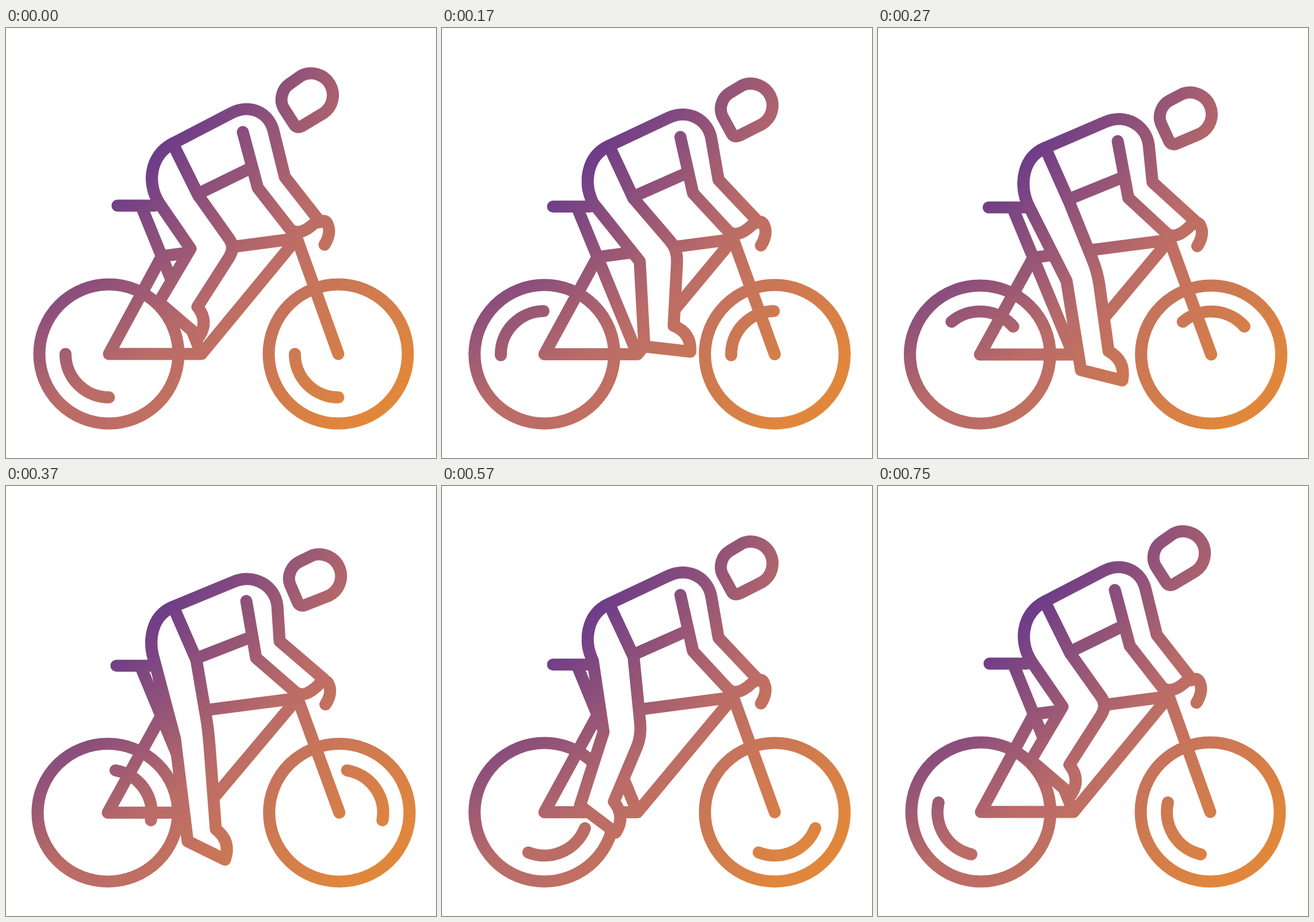
These frames come from a looping animation (748 by 748 pixels, 0.77 s). An HTML page with a canvas:

```html
<!DOCTYPE html>
<html lang="en">
<head>
<meta charset="utf-8">
<title>Cyclist</title>
<style>
  html, body { margin: 0; width: 100%; height: 100%; overflow: hidden; background: #fff; }
  canvas { display: block; }
</style>
</head>
<body>
<canvas id="stage" width="748" height="748"></canvas>
<script>
const SIZE = 748, LOOP = 770, CYCLE = 30;
const ctx = document.getElementById('stage').getContext('2d');

// Rose to orange along the diagonal, with a wide purple glow from the upper left
function makeInk() {
  const sheet = document.createElement('canvas');
  sheet.width = sheet.height = SIZE;
  const paint = sheet.getContext('2d');
  const base = paint.createLinearGradient(426, 426, 645, 645);
  base.addColorStop(0, '#bb6c67');
  base.addColorStop(1, '#e1873c');
  const glow = paint.createRadialGradient(-382, -382, 879, -382, -382, 1142);
  glow.addColorStop(0, 'rgba(109, 60, 137, 1)');
  glow.addColorStop(1, 'rgba(109, 60, 137, 0)');
  for (const fill of [base, glow]) {
    paint.fillStyle = fill;
    paint.fillRect(0, 0, SIZE, SIZE);
  }
  return ctx.createPattern(sheet, 'no-repeat');
}
const ink = makeInk();

const lerp = (a, b, k) => a + (b - a) * k;
const between = (p, q, k) => [lerp(p[0], q[0], k), lerp(p[1], q[1], k)];

// Blend two path strings that share the same commands
function blend(from, to, k) {
  const goal = to.match(/\d+/g);
  let n = 0;
  return from.replace(/\d+/g, v => lerp(+v, +goal[n++], k).toFixed(2));
}

const frame = new Path2D(
  'M194 309H258 M235 309L340 567 M506 366L271 397L179 567H340L506 366L578 567' +
  'M545 338Q556 331 560 343C565 354 560 368 554 377');

const head = new Path2D(
  'M482 140C474 126 479 107 492 98L512.5 83.5A38 38 0 0 1 551.5 148.5' +
  'L514 171Q505 176 500 168Z');

// Rider's upper body, raised and lowered
const torso = [
  'M266 304C245 270 250 222 290 201L392 148C425 131 459 147 466 182L485 259L543 333' +
  'Q514 364 495 351L438 278L412 181 M290 201L335 292 M335 288L427 243',
  'M258 304C247 270 252 226 291 210L395 167C432 151 468 174 472 208L476 270L553 336' +
  'Q521 373 503 358L435 299L418 200 M291 210L331 302 M333 299L428 262'
];
const rump = [
  'M335 292L290 201C250 222 245 270 266 304',
  'M331 302L291 210C252 226 247 270 258 304'
];

// Leg poses around one pedal turn: back of knee, heel, toe, ankle, kneecap
const poseSteps = [0, 7, 11, 15, 19, 23];
const poses = [
  [321, 384, 266, 477, 336, 537, 333, 485, 399, 382],
  [344, 406, 352, 554, 432, 563, 403, 518, 410, 386],
  [328, 440, 353, 595, 425, 613, 401, 562, 382, 425],
  [294, 440, 316, 618, 381, 650, 365, 597, 352, 425],
  [281, 444, 265, 605, 328, 646, 320, 587, 340, 451],
  [281, 428, 240, 556, 302, 603, 299, 549, 347, 435]
];

function legPose(step) {
  const count = poses.length;
  step %= CYCLE;
  let k = count - 1;
  while (poseSteps[k] > step) k--;
  const at = n => poses[(n + count) % count];
  const when = n => poseSteps[(n + count) % count] + CYCLE * Math.floor(n / count);
  const span = when(k + 1) - when(k), u = (step - when(k)) / span;
  const slope = (n, j) => (at(n + 1)[j] - at(n - 1)[j]) / (when(n + 1) - when(n - 1)) * span;
  const v = at(k).map((p, j) => {
    const q = at(k + 1)[j], a = slope(k, j), b = slope(k + 1, j);
    return p + u * (a + u * (3 * (q - p) - 2 * a - b + u * (2 * (p - q) + a + b)));
  });
  return [0, 2, 4, 6, 8].map(j => [v[j], v[j + 1]]);
}

function legPath(step, dip) {
  const [knee, heel, toe, ankle, cap] = legPose(step);
  const waist = [lerp(335, 331, dip), lerp(292, 302, dip)];
  const dx = toe[0] - ankle[0], dy = toe[1] - ankle[1];
  const instep = [ankle[0] + dx / 2 + dy * 0.36, ankle[1] + dy / 2 - dx * 0.36];
  return new Path2D(blend(...rump, dip) +
    `L${knee}L${heel}L${toe}Q${instep} ${ankle}` +
    `L${between(cap, ankle, 0.17)}Q${cap} ${between(cap, waist, 0.17)}Z`);
}

function drawWheel(x, turn) {
  ctx.beginPath();
  ctx.arc(x, 567, 121, 0, 2 * Math.PI);
  ctx.stroke();
  ctx.beginPath();
  ctx.arc(x, 567, 75.5, turn + Math.PI / 2, turn + Math.PI);
  ctx.stroke();
}

function drawBike(step, dip) {
  const turn = 12.68 * (step % 29) * Math.PI / 180;
  ctx.save();
  ctx.translate(378.5, 698);
  ctx.scale(1 + 0.0095 * dip, 1 - 0.0095 * dip);
  ctx.translate(-378.5, -698);
  drawWheel(179, turn);
  drawWheel(578, turn);
  ctx.stroke(frame);
  ctx.restore();
}

// The head's outline is moved point by point so that the ink stays fixed to the stage
function drawHead(dip) {
  const pose = new DOMMatrix()
    .translate(lerp(526, 539, dip), lerp(124.5, 163.5, dip))
    .rotate(dip * 9.5)
    .translate(-525, -125);
  const outline = new Path2D();
  outline.addPath(head, pose);
  ctx.stroke(outline);
}

function drawRider(step, dip) {
  const leg = legPath(step, dip);
  ctx.fill(leg);
  ctx.stroke(leg);
  ctx.stroke(new Path2D(blend(...torso, dip)));
  drawHead(dip);
}

function draw(now) {
  const t = now % LOOP;
  // Steps last 20 and 30 ms in turn
  const step = 2 * Math.floor(t / 50) + (t % 50 >= 20 ? 1 : 0);
  const dip = (1 - Math.cos(2 * Math.PI * step / CYCLE)) / 2;
  ctx.fillStyle = '#fff';
  ctx.fillRect(0, 0, SIZE, SIZE);
  ctx.strokeStyle = ink;
  ctx.lineWidth = 21;
  ctx.lineCap = ctx.lineJoin = 'round';
  drawBike(step, dip);
  drawRider(step, dip);
  requestAnimationFrame(draw);
}
requestAnimationFrame(draw);
</script>
</body>
</html>
```
